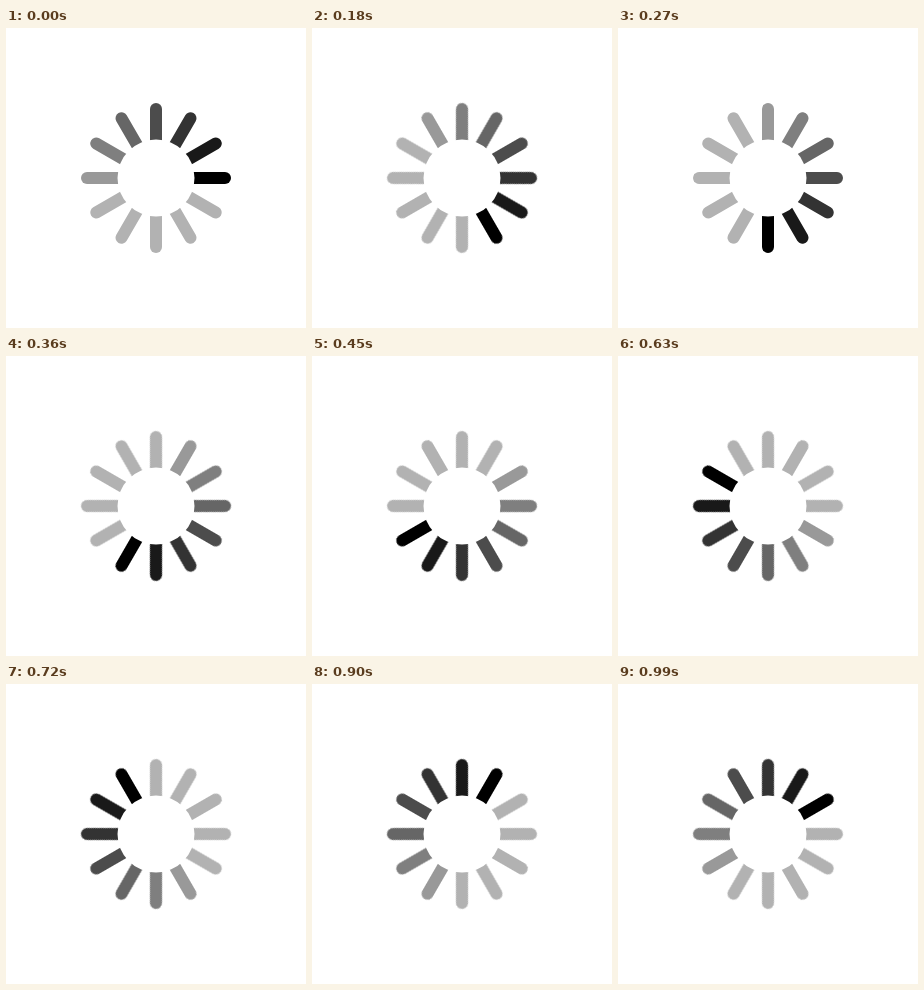
Write an HTML page that moves like this. It is 300x300 px and loops after 1.08 s.

```html
<!DOCTYPE html>
<html lang="en">
<head>
<meta charset="utf-8">
<title>Loading</title>
<style>
  html, body { margin: 0; width: 100%; height: 100%; overflow: hidden; background: #fff; }
  svg { display: block; width: 100vw; height: 100vh; }
  .spokes {
    stroke-width: 12;
    stroke-linecap: round;
    /* tiny head start keeps each step on the right side of its boundary */
    animation: spin 1080ms steps(12, end) -0.5ms infinite;
  }
  @keyframes spin { to { transform: rotate(360deg); } }
</style>
</head>
<body>
<svg viewBox="-150 -150 300 300" role="img" aria-label="Loading">
  <defs><path id="bar" d="M36 0H69"/></defs>
  <g class="spokes">
    <use href="#bar" stroke="#000"/>
    <use href="#bar" stroke="#191919" transform="rotate(-30)"/>
    <use href="#bar" stroke="#333" transform="rotate(-60)"/>
    <use href="#bar" stroke="#4c4c4c" transform="rotate(-90)"/>
    <use href="#bar" stroke="#666" transform="rotate(-120)"/>
    <use href="#bar" stroke="#7f7f7f" transform="rotate(-150)"/>
    <use href="#bar" stroke="#999" transform="rotate(-180)"/>
    <g stroke="#b2b2b2">
      <use href="#bar" transform="rotate(30)"/>
      <use href="#bar" transform="rotate(60)"/>
      <use href="#bar" transform="rotate(90)"/>
      <use href="#bar" transform="rotate(120)"/>
      <use href="#bar" transform="rotate(150)"/>
    </g>
  </g>
  <circle r="38.5" fill="#fff"/>
</svg>
</body>
</html>
```
